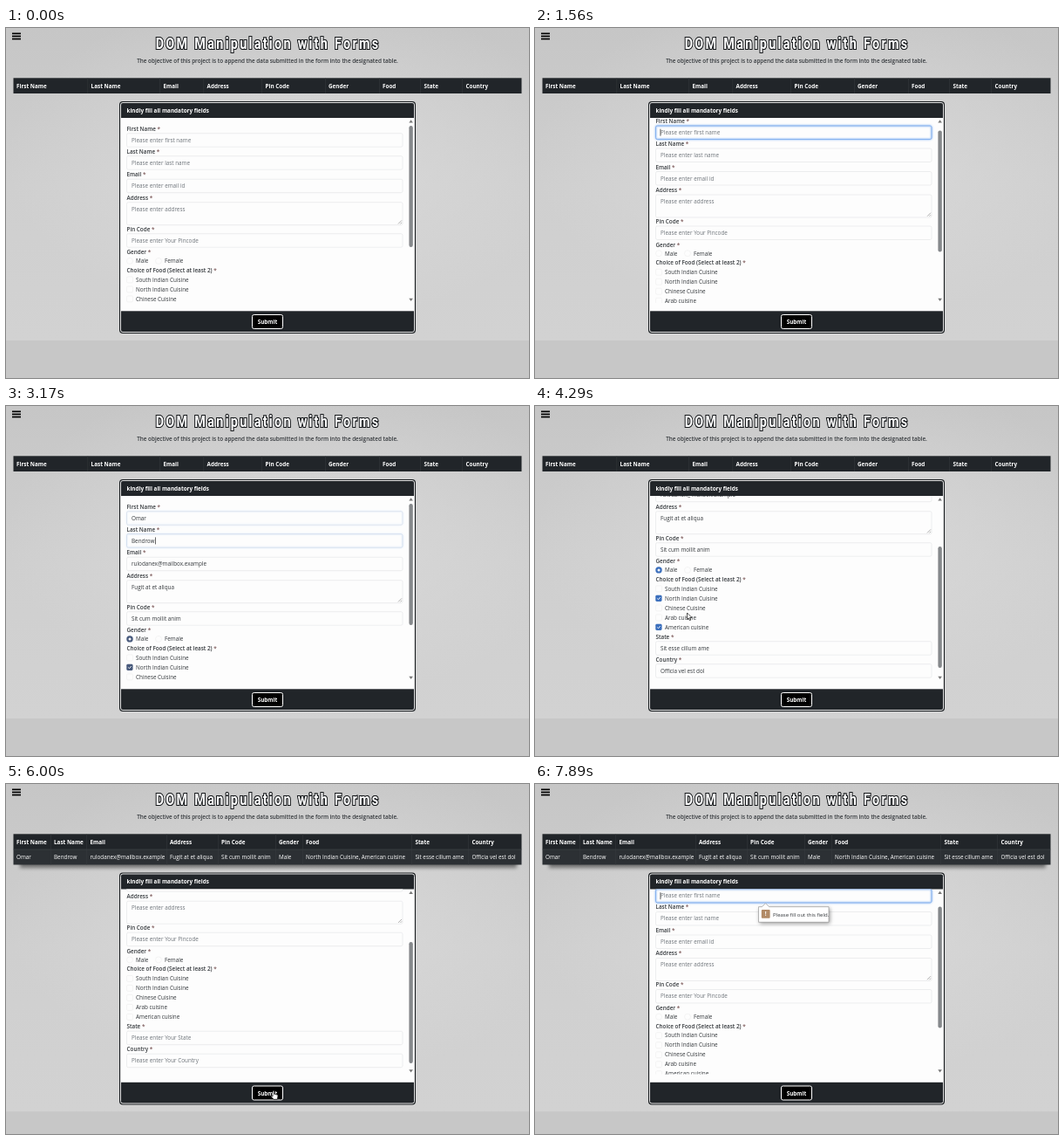
These frames come from a looping animation (600x401 px, 7990 ms). An HTML page:

```html
<!DOCTYPE html>
<html lang="en">
<head>
<meta charset="utf-8">
<title>DOM Manipulation with Forms</title>
<style>
  html, body { margin: 0; width: 100%; height: 100%; overflow: hidden; background: #c7c7c7; }
  svg { display: block; width: 600px; height: 401px; font: 400 6.33px "Open Sans", "Noto Sans", sans-serif; fill: #33373b; }
  .title { font: 700 14.4px Roboto, sans-serif; letter-spacing: 2.3px; fill: #fff; stroke: #15181b;
    stroke-width: 1.7px; paint-order: stroke; filter: drop-shadow(.7px .5px .6px #000b); }
  .semi { font-weight: 600; }
  .bold { font-weight: 700; }
  .small { font-size: 6px; }
  .white { fill: #fff; }
  .hint { fill: #6d7379; }
  .star { fill: #7d5a5a; }
  .box { fill: #fdfdfd; stroke: #e5e7e9; stroke-width: .7px; }
  .faint { stroke: #efefef; }
  .focus { fill: none; stroke: #86b2ef; stroke-width: 1px; filter: drop-shadow(0 0 1.2px #5b9bf5); }
</style>
</head>
<body>
<svg viewBox="0 0 600 401">
  <defs>
    <linearGradient id="wall" x2="0" y2="1">
      <stop stop-color="#c6c6c6"/><stop offset=".5" stop-color="#cfcfcf"/><stop offset="1" stop-color="#d2d2d2"/>
    </linearGradient>
    <radialGradient id="light">
      <stop stop-color="#dedede" stop-opacity=".7"/><stop offset="1" stop-color="#dedede" stop-opacity="0"/>
    </radialGradient>
    <clipPath id="view"><rect x="132" y="103" width="329" height="212"/></clipPath>
    <filter id="soft" x="-10%" y="-60%" width="120%" height="220%"><feGaussianBlur stdDeviation="2"/></filter>
  </defs>
  <g id="scene"></g>
</svg>
<script>
const LOOP = 7990, ROW = 17.5;
const FILL = 2790, SEND = 5450;
const scene = document.getElementById('scene');

const heads = ['First Name', 'Last Name', 'Email', 'Address', 'Pin Code', 'Gender', 'Food', 'State', 'Country'];
const emptyCols = [12, 97.6, 180.5, 230.6, 297.5, 370, 432, 479.5, 527.5];
const filledCols = [12, 55, 96.4, 188, 247, 313, 344, 469.4, 534.4];
const record = ['Omar', 'Bendrow', 'rulodanex@mailbox.example', 'Fugit at et aliqua', 'Sit cum mollit anim',
  'Male', 'North Indian Cuisine, American cuisine', 'Sit esse cillum ame', 'Officia vel est dol'];
// label, label centre, box height, placeholder, index in record
const fields = [
  ['First Name', 115, 15.5, 'first name', 0],
  ['Last Name', 141, 15.5, 'last name', 1],
  ['Email', 167.5, 15.5, 'email id', 2],
  ['Address', 194, 26, 'address', 3],
  ['Pin Code', 230, 15.5, 'Your Pincode', 4],
  ['State', 343, 15.5, 'Your State', 7],
  ['Country', 369, 15.5, 'Your Country', 8]
];
const foods = ['South Indian Cuisine', 'North Indian Cuisine', 'Chinese Cuisine', 'Arab cuisine', 'American cuisine'];

const scrollKeys = [[0, 0], [80, 0], [490, 87], [850, 87], [1150, 17.7], [1480, 17.7], [1640, 0], [3350, 0],
  [3620, 40], [3860, 40], [4150, 79], [SEND, 79], [5700, 83], [6940, 83], [7250, 17.7], [LOOP, 17.7]];
const firstMove = [[490, 380, 250], [660, 307, 336]];
const secondMove = [[3860, 205, 215], [4290, 174.5, 237], [4680, 176, 241], [5300, 308.5, 337],
  [5600, 308.5, 337], [6200, 302.5, 356]];

function track(keys, t, col = 1) {
  const i = keys.findIndex(k => k[0] > t);
  if (i < 0) return keys.at(-1)[col];
  if (!i) return keys[0][col];
  const a = keys[i - 1], b = keys[i], p = (t - a[0]) / (b[0] - a[0]);
  return a[col] + (b[col] - a[col]) * p * p * (3 - 2 * p);
}
const ramp = (t, from, to) => Math.min(1, Math.max(0, (t - from) / (to - from)));
const pulse = (t, from, to) => ramp(t, from, from + 150) * (1 - ramp(t, to, to + 150));

const text = (x, y, s, cls = '', more = '') => `<text x="${x}" y="${y + 2.3}" class="${cls}" ${more}>${s}</text>`;
const rect = (x, y, w, h, fill, more = '') =>
  `<rect x="${x}" y="${y}" width="${w}" height="${h}" fill="${fill}" ${more}/>`;
const path = (d, fill, more = '') => `<path d="${d}" fill="${fill}" ${more}/>`;
const box = (x, y, w, h, r, cls = '', opacity = 1) =>
  `<rect x="${x}" y="${y}" width="${w}" height="${h}" rx="${r}" class="box ${cls}" opacity="${opacity}"/>`;
const label = (y, s) => text(138.5, y, `${s} <tspan class="star">*</tspan>`, 'semi');
const caret = (x, y) => rect(x, y - 4, .7, 8, '#222');

function page(sent) {
  const wall = 358 + (sent ? ROW : 0);
  return rect(0, 0, 600, wall, 'url(#wall)')
    + `<ellipse cx="330" cy="150" rx="330" ry="190" fill="url(#light)"/>`
    + rect(0, wall, 600, 60, '#c7c7c7')
    + [5.5, 8.6, 11.7].map(y => rect(7, y, 10, 1.7, '#000')).join('')
    + `<g transform="translate(300.6 24.4) scale(1 1.32)"><text class="title" text-anchor="middle">DOM Manipulation with Forms</text></g>`
    + text(300, 37.2, 'The objective of this project is to append the data submitted in the form into the designated table.',
      'semi', 'text-anchor="middle"');
}

function table(sent) {
  const cols = sent ? filledCols : emptyCols;
  let s = sent ? rect(16, 86, 570, 10, '#0007', 'filter="url(#soft)"') : '';
  s += rect(8.5, 57.3, 583, ROW + .2, '#212529');
  if (sent) s += rect(8.5, 75, 583, ROW, '#2c3034') + rect(8.5, 74.7, 583, .6, '#40464b');
  cols.forEach((x, i) => {
    if (i) s += rect(x - 4, 57.3, .5, sent ? 35.2 : 17.7, '#373b3e');
    s += text(x, 66.7, heads[i], 'bold white');
    if (sent) s += text(x, 84.1, record[i], 'white');
  });
  return s;
}

function form(t, filled) {
  const glow = [Math.max(pulse(t, 850, 3080), ramp(t, 6940, 7090)), pulse(t, 3100, 3700)];
  let s = '';
  fields.forEach(([name, y, h, hint, col], i) => {
    const mid = y + 13;
    s += label(y, name) + box(138.5, y + 5.3, 316.5, h, 1.8);
    if (glow[i]) s += box(138.5, y + 5.3, 316.5, h, 1.8, 'focus', glow[i] ** 2);
    s += filled ? text(144, mid, record[col]) : text(144, mid, 'Please enter ' + hint, 'hint');
    if (glow[i] && !(i === 0 && t > 3080 && t < SEND)) s += caret(filled && i ? 171 : 143.6, mid);
    if (h > 20) s += path(`M450 ${y + 30}l4-4m-1.5 4l1.5-1.5`, 'none', 'stroke="#777" stroke-width=".6"');
  });
  const accent = t < 3300 ? '#47597c' : '#3b6fbd';
  s += label(256.5, 'Gender') + box(138.5, 263, 7, 7, 3.5, 'faint') + box(171.5, 263, 7, 7, 3.5, 'faint')
    + text(149, 266.5, 'Male') + text(182, 266.5, 'Female');
  if (filled) s += `<circle cx="142" cy="266.5" r="3.7" fill="${accent}"/><circle cx="142" cy="266.5" r="1.5" fill="#fff"/>`;
  s += label(277.3, 'Choice of Food (Select at least 2)');
  foods.forEach((food, i) => {
    const y = 288 + 11 * i;
    s += box(138.5, y - 3.5, 7, 7, 1.4, 'faint') + text(149, y, food);
    if (filled && (i === 1 || i === 4))
      s += rect(138.3, y - 3.6, 7.2, 7.2, accent, 'rx="1.4"')
        + path(`M140.2 ${y}l1.3 1.3 2.2-2.6`, 'none', 'stroke="#fff" stroke-width=".9"');
  });
  return s;
}

function dialog(t, filled) {
  const scroll = track(scrollKeys, t);
  const tip = t < 2000 ? pulse(t, 1150, 1400) : ramp(t, 7300, 7450);
  return rect(130, 84, 340, 266, '#171b1e', 'rx="4"')
    + rect(131.5, 85.5, 337, 263, '#212529', 'rx="2.5" stroke="#e6e6e6"')
    + rect(132, 103, 336, 221.3, '#fdfdfd')
    + text(138.5, 94.5, 'kindly fill all mandatory fields', 'bold white')
    + `<g clip-path="url(#view)"><g transform="translate(0 ${.4 - scroll})">${form(t, filled)}</g></g>`
    + rect(462.4, 112 + scroll * .62, 4.4, 139, '#85888b', 'rx="2.2"')
    + path('M462.3 108.6l2.3-3.4 2.3 3.4zM462.3 309.7l2.3 3.4 2.3-3.4z', '#777')
    + rect(282.5, 328.5, 35, 16, '#000', 'rx="2" stroke="#fff"')
    + text(300, 336.8, 'Submit', 'bold white', 'text-anchor="middle"')
    + (tip ? `<g opacity="${tip}">${tooltip()}</g>` : '');
}

function tooltip() {
  return rect(257.5, 124.5, 81, 18, '#0006', 'rx="2" filter="url(#soft)"')
    + path('M256.5 123.2h4l4-4 4 4h68.5v17.6h-80.5z', '#fff', 'stroke="#9a9a9a" stroke-width=".7"')
    + rect(259.8, 126.5, 9.8, 9.8, '#b18a66', 'rx="1"')
    + text(264.7, 131.5, '!', 'bold white', 'text-anchor="middle"')
    + text(273, 132, 'Please fill out this field.', 'small');
}

function pointer(t) {
  const early = t >= 490 && t < 1400, late = t >= 3860 && t < 7300;
  if (!early && !late) return '';
  const keys = early ? firstMove : secondMove;
  const x = track(keys, t), y = track(keys, t, 2);
  const hand = early ? t > 600 : t > 5200;
  const shape = hand
    ? 'M2 .8q1-1.2 1.8 0v3.4l3.4.8q.9.4.7 1.6l-.7 3.6h-4.2l-3-3.4q.2-1.3 2 0z'
    : 'M0 0v7.6l1.8-1.6 1.2 2.7 1.3-.6-1.2-2.6h2.4z';
  return path(shape, '#fff', `stroke="#111" stroke-width=".7" transform="translate(${x} ${y})"`);
}

function draw() {
  const t = performance.now() % LOOP;
  const sent = t >= SEND, filled = t >= FILL && !sent;
  scene.innerHTML = page(sent) + table(sent)
    + `<g transform="translate(0 ${sent ? ROW : 0})">${dialog(t, filled)}</g>` + pointer(t);
  requestAnimationFrame(draw);
}
draw();
</script>
</body>
</html>
```
